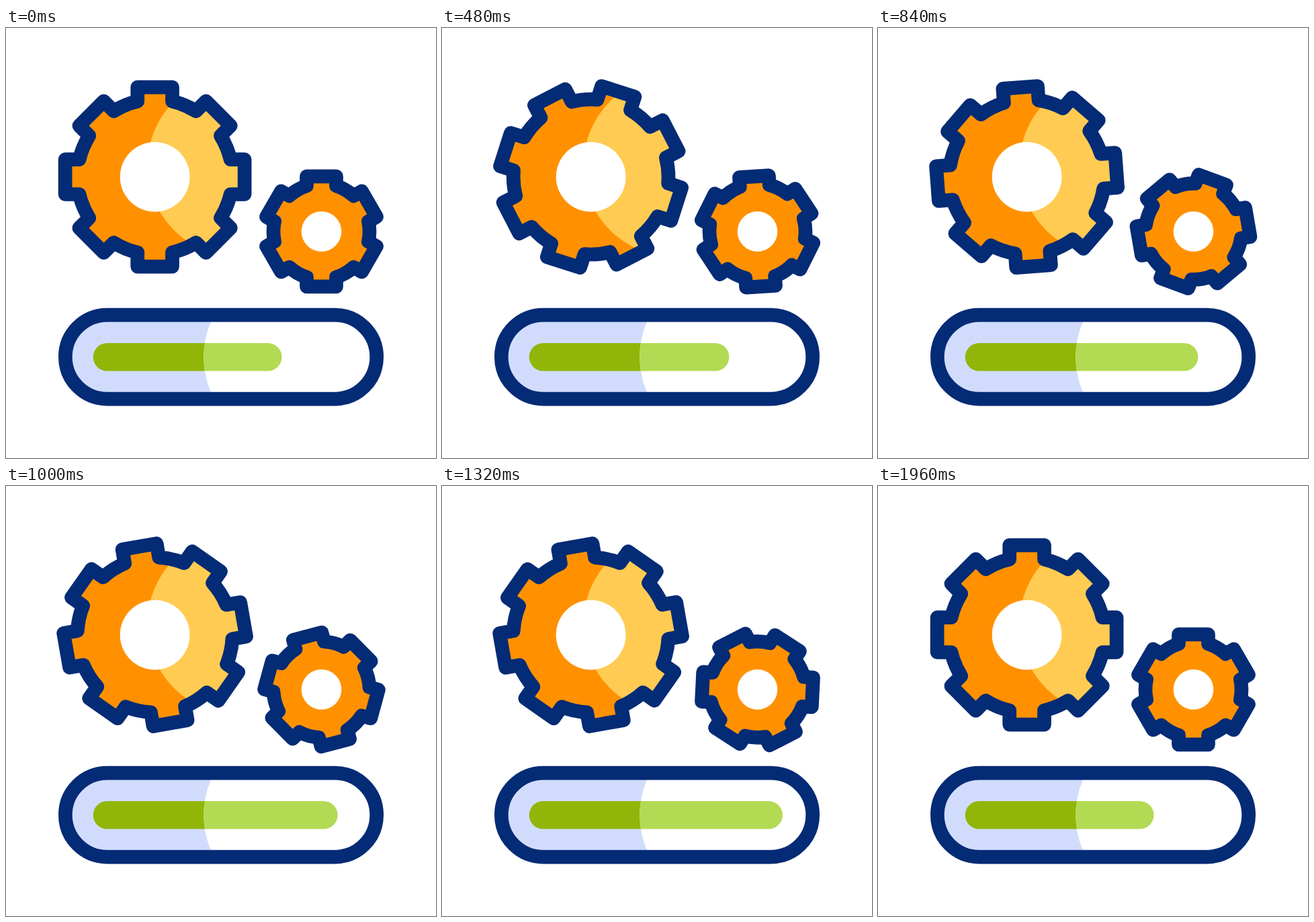
An HTML page that plays this animation: 640x640 px, repeating every 2000 ms.

```html
<!DOCTYPE html>
<html lang="en">
<head>
<meta charset="utf-8">
<title>Gears and progress</title>
<style>
  html, body { margin: 0; width: 100%; height: 100%; overflow: hidden; background: #fff; }
  svg { display: block; width: 100vw; height: 100vh; }
  .line { fill: none; stroke: #042b75; stroke-width: 20.7; stroke-linejoin: round; }
</style>
</head>
<body>
<svg viewBox="0 0 640 640">
  <defs>
    <path id="bigShape"/>
    <path id="smallShape"/>
    <clipPath id="bigClip"><path id="bigClipShape"/></clipPath>
    <clipPath id="barClip"><circle cx="428.5" cy="489.6" r="134.2"/></clipPath>
  </defs>

  <use href="#bigShape" fill="#ff9100"/>
  <circle cx="346" cy="205.1" r="135.6" fill="#ffcb52" clip-path="url(#bigClip)"/>
  <use href="#bigShape" class="line"/>
  <circle cx="221.6" cy="221.6" r="51.9" fill="#fff"/>

  <use href="#smallShape" fill="#ff9100"/>
  <use href="#smallShape" class="line"/>
  <circle cx="469.5" cy="302.9" r="29.8" fill="#fff"/>

  <rect x="88.3" y="427.1" width="463.4" height="125" rx="62.5" fill="#d1dcfd"/>
  <rect class="bar" x="129.7" y="468.9" height="41.6" rx="20.8" fill="#91b508"/>
  <g clip-path="url(#barClip)">
    <rect x="88.3" y="427.1" width="463.4" height="125" rx="62.5" fill="#fff"/>
    <rect class="bar" x="129.7" y="468.9" height="41.6" rx="20.8" fill="#b2da53"/>
  </g>
  <rect x="88.3" y="427.1" width="463.4" height="125" rx="62.5" class="line"/>
</svg>
<script>
  const LOOP = 2000, STEP = 40;
  const $ = id => document.getElementById(id);

  // Outline of a gear centred on the origin.
  function gearPath(teeth, tip, body, half) {
    const base = Math.sqrt(body * body - half * half);
    let d = '';
    for (let i = 0; i < teeth; i++) {
      const a = i * 2 * Math.PI / teeth, c = Math.cos(a), s = Math.sin(a);
      const at = (x, y) => `${(x * c - y * s).toFixed(2)} ${(x * s + y * c).toFixed(2)}`;
      d += i ? `A${body} ${body} 0 0 1 ` : 'M';
      d += `${at(-half, -base)}L${at(-half, -tip)}L${at(half, -tip)}L${at(half, -base)}`;
    }
    return d + `A${body} ${body} 0 0 1 ${-half} ${-base.toFixed(2)}Z`;
  }

  // Ease in and out, as cubic-bezier(.55, 0, .45, 1).
  function ease(x) {
    if (x <= 0) return 0;
    if (x >= 1) return 1;
    let lo = 0, hi = 1, s;
    for (let i = 0; i < 24; i++) {
      s = (lo + hi) / 2;
      const q = 1 - s;
      if (1.65 * s * q * q + 1.35 * s * s * q + s * s * s < x) lo = s; else hi = s;
    }
    return s * s * (3 - 2 * s);
  }
  const tween = (t, from, to) => ease((t - from) / (to - from));

  const bigPath = gearPath(8, 133.5, 115.4, 25.9);
  $('bigShape').setAttribute('d', bigPath);
  $('bigClipShape').setAttribute('d', bigPath);
  $('smallShape').setAttribute('d', gearPath(6, 82, 71.5, 22));
  const bars = document.querySelectorAll('.bar');

  function draw(t) {
    const big = `translate(221.6 221.6) rotate(${180 * tween(t, 84, 1629)})`;
    $('bigShape').setAttribute('transform', big);
    $('bigClipShape').setAttribute('transform', big);
    $('smallShape').setAttribute('transform',
      `translate(469.5 302.9) rotate(${-180 * tween(t, 288, 1831)})`);
    const grown = tween(t, 30, 1415) - tween(t, 1415, 1946);
    bars.forEach(b => b.setAttribute('width', 280.8 + 97 * grown));
  }

  const start = performance.now();
  function tick() {
    const t = (performance.now() - start) % LOOP;
    draw(Math.floor(t / STEP) * STEP);
    requestAnimationFrame(tick);
  }
  tick();
</script>
</body>
</html>
```
